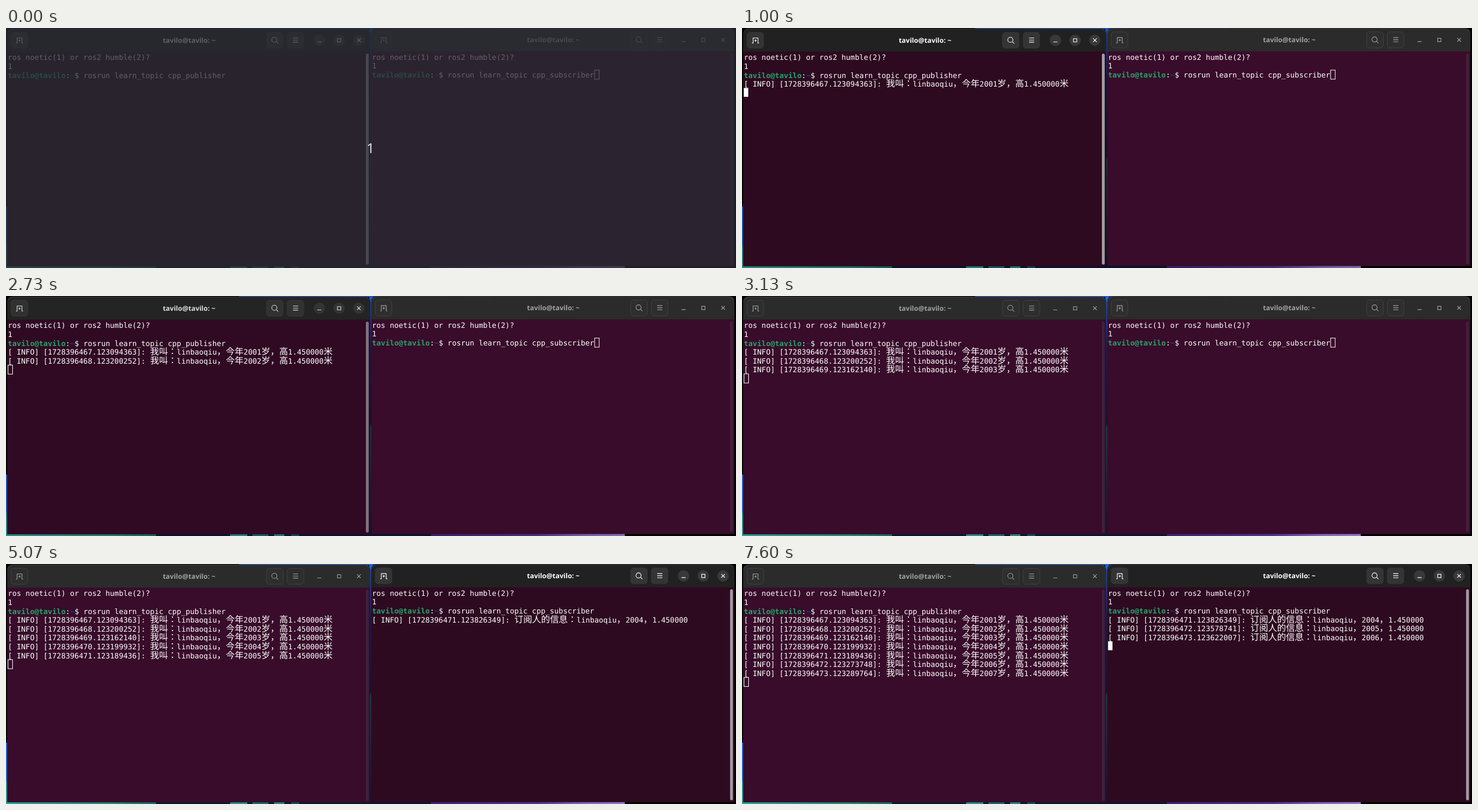
An HTML page for the animation above (8 s loop, 1280x422 px).

```html
<!DOCTYPE html>
<html lang="en">
<head>
<meta charset="utf-8">
<title>Two terminals</title>
<style>
  html, body { margin: 0; width: 100%; height: 100%; overflow: hidden; background: #000; }
  svg { display: block; width: 100%; height: 100%; }
  text { white-space: pre; text-rendering: geometricPrecision; }
  .mono { font: 12.956px "DejaVu Sans Mono", "Noto Sans Mono", monospace; fill: #fff; }
  .cjk { font: 15.6px "Noto Sans CJK JP", "Noto Sans CJK SC", sans-serif; fill: #fff; }
  .title { font: bold 12px "Noto Sans", "Open Sans", sans-serif; text-anchor: middle; }
  .user { font-weight: bold; fill: #26a269; }
  .path { font-weight: bold; fill: #12488b; }
  .count { font: 24px "Noto Sans", "Open Sans", sans-serif; fill: #dcdcee; text-anchor: middle; }
</style>
</head>
<body>
<svg id="stage" viewBox="0 0 1280 422" preserveAspectRatio="none"></svg>
<script>
const LOOP = 8000, CELL = 7.8, ROW = 15.6;
const USER = 'tavilo', NAME = 'linbaoqiu';
const HOST = `${USER}@${USER}`;
const DX = 638.6, DY = -0.6;

const rect = (x, y, w, h, fill, more = '') =>
  `<rect x="${x}" y="${y}" width="${w}" height="${h}" fill="${fill}" ${more}/>`;

const gradient = (id, vertical, stops) =>
  `<linearGradient id="${id}" x1="0" y1="0" x2="${vertical ? 0 : 1}" y2="${vertical ? 1 : 0}">` +
  stops.map(([at, color]) => `<stop offset="${at}" stop-color="${color}"/>`).join('') +
  '</linearGradient>';

// Thin slivers of wallpaper around the windows
function desktop() {
  return '<defs>' +
    gradient('top', false, [[0, '#1c4fc0'], [.5, '#2566e4'], [.56, '#12307c'], [1, '#0a1a4c']]) +
    gradient('gap', true, [[0, '#2463dc'], [.08, '#1a48ac'], [.22, '#0d2158'], [.53, '#081434'], [.55, '#104850'], [.75, '#0c2c44'], [1, '#081430']]) +
    gradient('side', true, [[0, '#2862c8'], [.6, '#2a66c4'], [.64, '#2a8a90'], [1, '#2f9a90']]) +
    gradient('teal', false, [[0, '#2f9a90'], [.7, '#268078'], [1, '#1c645f']]) +
    gradient('lilac', false, [[0, '#3a2470'], [.55, '#4c3488'], [.8, '#8068b8'], [1, '#9078c0']]) +
    '</defs>' +
    rect(409, 0, 441, 2, 'url(#top)') +
    rect(637, 0, 6, 422, 'url(#gap)') +
    rect(0, 314, 3, 108, 'url(#side)') +
    rect(0, 418, 263, 4, 'url(#teal)') +
    rect(263, 418, 482, 4, '#0c1434') +
    rect(393, 418, 30, 4, '#2a8a84') +
    rect(432, 418, 28, 4, '#1c6468') +
    rect(470, 418, 18, 4, '#2a8078') +
    rect(500, 418, 14, 4, '#174c58') +
    rect(745, 418, 340, 4, 'url(#lilac)');
}

function chrome(active) {
  const c = active
    ? { head: '#212121', body: '#2d0a20', btn: '#343434', edge: '#343434', icon: '#ffffff', bar: '#a29b9f' }
    : { head: '#2b2b2b', body: '#380c2a', btn: '#2e2e2e', edge: '#414141', icon: '#a2a2a2', bar: '#43203a' };
  const button = x => rect(x, 7.5, 29.2, 28, c.btn, `rx="5" stroke="${c.edge}"`);
  const circle = x => active ? `<circle cx="${x}" cy="21.5" r="10" fill="#383838"/>` : '';
  const newTab = 'M17.5 26.5H19.500V17.500H28V26.500H30';
  const plus = 'M23.750 20v4M21.750 22h4';
  const search = 'M474.300 24.300l3 3M475 20.700a4.500 4.500 0 1 1-9 0a4.500 4.500 0 1 1 9 0';
  const menu = 'M503.300 17.500h9M503.300 21.200h9M503.300 24.900h9';
  const controls = 'M546 24.500h7M581.200 18.700h5.800v5.800h-5.800zM615.600 18.200l6.400 6.400M622 18.200l-6.400 6.400';
  return `<path d="M2 419V11q0-10 10-10H628.500q10 0 10 10V419z" fill="${c.body}"/>` +
    `<path d="M2 41.500V11q0-10 10-10H628.500q10 0 10 10V41.500z" fill="${c.head}"/>` +
    `<path d="M4 7Q6.500 1.500 12 1.500H628.500Q634 1.500 636.500 7" fill="none" stroke="#fff" stroke-opacity=".1"/>` +
    [8.8, 456.7, 492.9].map(button).join('') +
    [549.5, 584, 618.7].map(circle).join('') +
    `<path d="${newTab}${plus}${search}${menu}${controls}" fill="none" stroke="${c.icon}" stroke-width="1.1"/>` +
    `<text class="title" x="321" y="25.7" fill="${c.icon}">${HOST}: ~</text>` +
    rect(631, 45, 5, 371, c.bar, 'rx="2.500"');
}

const textAt = (row, col, str, cls) =>
  `<text class="${cls}" x="${3.2 + col * CELL}" y="${56.4 + row * ROW}">${str}</text>`;

// Wide characters take two cells
function line(row, str, col = 0) {
  return str.match(/[\x00-\x7f]+|[^\x00-\x7f]+/g).map(run => {
    const wide = run.charCodeAt(0) > 127;
    const out = textAt(row, col, run, wide ? 'cjk' : 'mono');
    col += run.length * (wide ? 2 : 1);
    return out;
  }).join('');
}

const prompt = command =>
  line(0, 'ros noetic(1) or ros2 humble(2)?') + line(1, '1') +
  textAt(2, 0, HOST, 'mono user') + line(2, ':', 13) +
  textAt(2, 14, '~', 'mono path') + line(2, '$ ' + command, 15);

const stamp = (sec, nano) => `[ INFO] [17283964${sec}.${nano}]: `;

const panes = [
  {
    x: 0, y: 0, command: 'rosrun learn_topic cpp_publisher',
    logs: [
      [1000, '123094363'], [2070, '123200252'], [3130, '123162140'], [4070, '123199932'],
      [5070, '123189436'], [6000, '123273748'], [7070, '123289764']
    ],
    say: (i, nano) => stamp(67 + i, nano) + `我叫：${NAME}，今年${2001 + i}岁，高1.450000米`,
    focus: [[0, 1], [2730, .65], [2800, .3], [2870, .08], [2930, 0]],
    cursor: [
      [0, ''], [530, 'block', 2, 49], [870, 'block', 3, 0], [1000, 'block', 4, 0], [1470, ''],
      [1870, 'box', 4, 0], [2070, 'box', 5, 0], [3130, 'box', 6, 0], [4070, 'box', 7, 0],
      [5070, 'box', 8, 0], [6000, 'box', 9, 0], [7070, 'box', 10, 0]
    ]
  },
  {
    x: DX, y: DY, command: 'rosrun learn_topic cpp_subscriber',
    logs: [[5070, '123826349'], [6000, '123578741'], [7070, '123622007']],
    say: (i, nano) => stamp(71 + i, nano) + `订阅人的信息：${NAME}，${2004 + i}，1.450000`,
    focus: [[0, 0], [3600, .35], [3670, .7], [3730, .92], [3800, 1]],
    cursor: [
      [0, 'box', 2, 50], [3600, 'block', 2, 50], [4070, 'block', 3, 0], [4600, ''],
      [5200, 'block', 4, 0], [5800, ''], [6400, 'block', 5, 0], [7000, ''], [7600, 'block', 6, 0]
    ]
  }
];

const stage = document.getElementById('stage');
stage.innerHTML = rect(0, 0, 1280, 422, '#000') +
  `<g id="desk">${desktop()}</g>` +
  panes.map((p, n) =>
    `<g transform="translate(${p.x} ${p.y})">${chrome(false)}<g id="active${n}">${chrome(true)}</g>` +
    prompt(p.command) +
    p.logs.map(([, nano], i) => `<g id="log${n}-${i}">${line(3 + i, p.say(i, nano))}</g>`).join('') +
    `</g><rect id="cursor${n}" stroke="#fff"/>`).join('') +
  `<g id="cover">${rect(0, 0, 1280, 422, '#282b32', 'fill-opacity=".75"')}` +
  '<text class="count" x="639" y="220">1</text></g>';

const get = id => document.getElementById(id);
const show = (el, on) => el.setAttribute('visibility', on ? 'visible' : 'hidden');
const at = (steps, t) => steps.filter(s => s[0] <= t).pop();

function drawCursor(el, pane, [, kind, row, col]) {
  show(el, kind);
  if (!kind) return;
  const x = 3.2 + pane.x + col * CELL, y = 43 + pane.y + row * ROW;
  const attrs = kind === 'box'
    ? { x: x + .3, y: y + .4, width: 8, height: 16, fill: 'none', 'stroke-width': 1 }
    : { x, y, width: CELL, height: ROW, fill: '#fff', 'stroke-width': 0 };
  for (const k in attrs) el.setAttribute(k, attrs[k]);
}

function render(t) {
  panes.forEach((p, n) => {
    get('active' + n).setAttribute('opacity', at(p.focus, t)[1]);
    p.logs.forEach(([start], i) => show(get(`log${n}-${i}`), t >= start));
    drawCursor(get('cursor' + n), p, at(p.cursor, t));
  });
  get('desk').setAttribute('opacity', 1 - .15 * at(panes[0].focus, t)[1]);
  show(get('cover'), t < 70);
}

const begin = performance.now();
function tick() {
  render((performance.now() - begin) % LOOP);
  requestAnimationFrame(tick);
}
tick();
</script>
</body>
</html>
```
